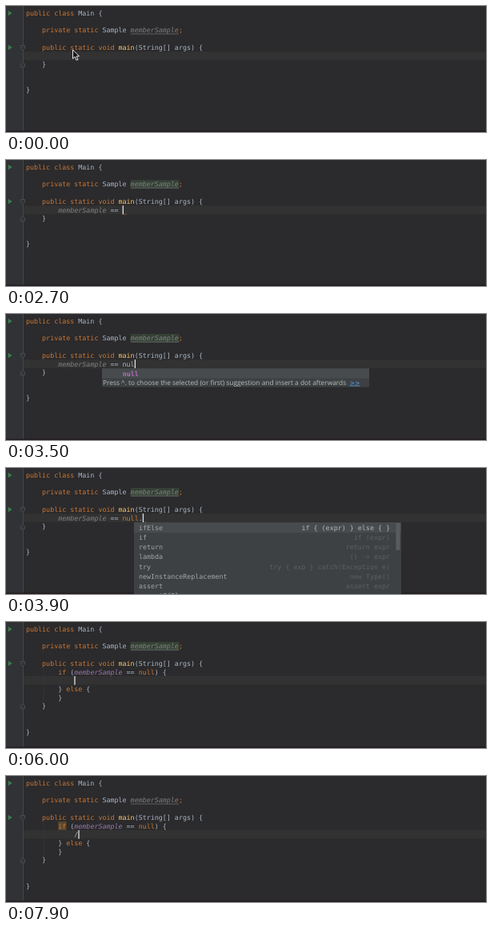
Recreate the animation shown at these times as an HTML page. Size 600 by 158 pixels, loop 8 s.

```html
<!DOCTYPE html>
<html lang="en">
<head>
<meta charset="utf-8">
<title>Postfix completion</title>
<style>
  html, body { margin: 0; width: 100%; height: 100%; overflow: hidden; background: #2b2a2c; }
  svg { display: block; width: 600px; height: 158px; }
  text { font: 8.35px "DejaVu Sans Mono", monospace; fill: #a9b7c6; white-space: pre; text-rendering: geometricPrecision; }
  .kw { fill: #cc7832; }
  .fn { fill: #ffc66d; }
  .unused { fill: #808084; font-style: italic; }
  .field { fill: #9876aa; font-style: italic; }
  .fold { fill: #2b2a2c; stroke: #595c5f; stroke-width: .7; }
  .run { fill: #3a7d4a; }
  .row { fill: #a2a6a8; }
  .dim { fill: #5c6062; }
  .lit { fill: #b4b8ba; }
  .end { text-anchor: end; }
  .word { fill: #b56cbc; font-weight: bold; }
  .hint { font: 8.36px "Open Sans", sans-serif; fill: #bbb; }
  .arrow { font: 6.2px "DejaVu Sans", sans-serif; }
  .link { font: 7.8px "DejaVu Sans", sans-serif; fill: #589df6; text-decoration: underline; }
</style>
</head>
<body>
<svg viewBox="0 0 600 158">
  <rect width="600" height="158" fill="#2b2a2c"/>
  <rect width="21" height="158" fill="#303235"/>
  <rect id="line" x="22" width="578" height="10.8" fill="#323232"/>
  <path d="M21.5 0V158" stroke="#454749"/>
  <rect y="156.5" width="600" height="1.5" fill="#231c23"/>
  <path class="run" d="M2.7 5.7L7.8 9L2.7 12.3zM2.7 48.7L7.8 52L2.7 55.3z"/>

  <rect data-t="1800-6500" x="155.7" y="25" width="61" height="10.8" fill="#344134"/>
  <path d="M155.7 35H216" stroke="#707073" stroke-width=".8"/>

  <g id="code"></g>
  <text id="typed" data-t="0-5600"><tspan></tspan><tspan></tspan><tspan></tspan><tspan></tspan><tspan></tspan></text>

  <g id="caret">
    <rect data-t="500-5300 5600-7500 7900-8000" width="1.3" height="11" fill="#e0e0e0"/>
    <path data-t="2700-2900 3800-4300 4900-5500" d="M.5 11.4l1.2-1 1.2 1 1.2-1 1 1" fill="none" stroke="#b0653a" stroke-width=".8"/>
  </g>
  <g id="popups"></g>
  <g data-t="5000-5500">
    <circle cx="487.4" cy="74.2" r="3.8" fill="#f0b650"/>
    <path d="M485.8 78.6h3M486.3 80h2" stroke="#a9a9a9" stroke-width=".9"/>
  </g>
  <path data-t="0-700" d="M83.5 55v11l2.6-2.4 2 4.4 1.9-.9-2-4.1h3.5z" fill="#111" stroke="#fff" stroke-width=".9"/>
</svg>
<script>
const LOOP = 8000, LEFT = 25, CHAR = 5.027, TOP = 3.55, PITCH = 10.72;
const $ = id => document.getElementById(id);
const colX = col => LEFT + col * CHAR;
const lineY = n => TOP + n * PITCH;
const span = (cls, s) => `<tspan class="${cls}">${s}</tspan>`;
const kw = s => span('kw', s);
const timed = (when, body) => `<g data-t="${when}">${body}</g>`;
const code = (n, col, body) => `<text x="${colX(col)}" y="${lineY(n) + 8.45}">${body}</text>`;
// Fold marker: a pentagon pointing down (dir 1) or up (dir -1)
const fold = (n, dir) =>
  `<path class="fold" transform="translate(21 ${lineY(n) + 5.8}) scale(1 ${dir})" d="M-2.5-2.7h5v3.6l-2.5 2-2.5-2zM-1.3-.4h2.6"/>`;

$('code').innerHTML =
  code(0, 0, kw('public class') + ' Main {') +
  code(2, 4, kw('private static') + ' Sample ' + span('unused', 'memberSample') + kw(';')) +
  code(4, 4, kw('public static void ') + span('fn', 'main') + '(String[] args) {') +
  fold(4, 1) +
  timed('0-5600', code(6, 4, '}') + code(9, 0, '}') + fold(6, -1)) +
  timed('5600-8000',
    '<path d="M47 57V100" stroke="#3b3b3b" stroke-dasharray="1 1"/>' +
    timed('6500-8000', `<rect x="${colX(8)}" y="${lineY(5)}" width="10.2" height="10.7" fill="#5a482c"/>`) +
    code(5, 8, kw('if') + ' (' + span('field', 'memberSample') + ' == ' + kw('null') + ') {') +
    code(7, 8, '} ' + kw('else') + ' {') + code(8, 8, '}') +
    code(9, 4, '}') + code(12, 0, '}') + fold(9, -1)) +
  timed('7900-8000', code(6, 12, '/'));

// Completion list: rows are [label, description]
function popup({ when, x, textX, rows, hint, step = 12.2, cls = 'row', mark = '' }) {
  const y = 68, w = 334, hintY = y + 1 + rows.length * step;
  const h = hint ? hintY - y + 10.9 : 100;
  let s = `<rect x="${x}" y="${y}" width="${w}" height="${h}" fill="#3d4143"/>` +
    `<rect x="${x}" y="${y + .5}" width="${w}" height="${step + .5}" fill="#474b4d"/>`;
  rows.forEach(([label, info = ''], i) => {
    const base = y + 9.7 + i * step;
    s += `<text class="${cls}" x="${textX}" y="${base}">${label}</text>` +
      `<text class="end ${i ? 'dim' : 'lit'}" x="480" y="${base}">${info}</text>`;
  });
  if (hint) s += `<text class="hint" x="${x + 1}" y="${hintY + 7.9}">${hint}  ${span('link', '&gt;&gt;')}</text>`;
  return timed(when, s + mark);
}

const dotHint = 'Press ^. to choose the selected (or first) suggestion and insert a dot afterwards';
const moveHint = `^${span('arrow', '↓')} and ^${span('arrow', '↑')} will move caret down and up in the editor`;
const ifRow = ['if', 'if (expr)'];
const ifElse = ['ifElse', 'if { (expr) } else { }'];

$('popups').innerHTML =
  popup({ when: '900-1500', x: 40, textX: colX(8), step: 11.7, hint: dotHint,
    rows: [[span('word', 'mem') + 'berSample']] }) +
  popup({ when: '3000-3300', x: 120, textX: colX(24), hint: dotHint,
    rows: [['null'], ['new'], ['notify']].map(([s]) => [span('word', s[0]) + s.slice(1)]) }) +
  popup({ when: '3300-3800', x: 120, textX: colX(24), step: 11.7, cls: 'word', hint: dotHint, rows: [['null']] }) +
  popup({ when: '3900-4500', x: 160, textX: 166,
    rows: [ifElse, ifRow, ['return', 'return expr'], ['lambda', '() -&gt; expr'],
      ['try', 'try { exp } catch(Exception e)'], ['newInstanceReplacement', 'new Type()'],
      ['assert', 'assert expr'], ['exceptIfElse']],
    mark: '<rect x="487.5" y="69" width="5" height="34" fill="#595c5e"/>' }) +
  popup({ when: '4500-5500', x: 160, textX: 166, hint: moveHint,
    rows: [ifRow, ifElse, ['ifElseIf', 'if { (expr) } elseif() { } else { }']],
    mark: '<text class="hint end" x="493.3" y="113.5" style="fill:#4f9be0">π</text>' });

// [time, characters typed]
const keys = [[0, 0], [700, 1], [800, 2], [900, 3], [1500, 12], [1800, 13], [2000, 14], [2300, 15],
  [2700, 16], [2900, 17], [3200, 18], [3500, 19], [3600, 20], [3800, 21], [4300, 22], [4900, 23], [5500, 20]];
// [text, class once complete]
const parts = [['memberSample', 'unused'], [' == ', ''], ['null', 'kw'], ['.', ''], ['if', 'kw']];
const typed = $('typed'), spans = [...typed.children];
typed.setAttribute('x', colX(8));
typed.setAttribute('y', lineY(5) + 8.45);

const windows = [...document.querySelectorAll('[data-t]')].map(el =>
  [el, el.dataset.t.split(' ').map(w => w.split('-').map(Number))]);

function draw(t) {
  for (const [el, list] of windows)
    el.style.display = list.some(([a, b]) => t >= a && t < b) ? '' : 'none';

  const count = keys.filter(k => k[0] <= t).pop()[1];
  let left = count;
  parts.forEach(([s, cls], i) => {
    const n = Math.max(0, Math.min(left, s.length));
    spans[i].textContent = s.slice(0, n);
    spans[i].setAttribute('class', n === s.length ? cls : '');
    left -= n;
  });

  const row = t < 5600 ? 5 : 6;
  const col = t < 5600 ? 8 + count : t < 7900 ? 12 : 13;
  $('line').setAttribute('y', lineY(row));
  $('caret').setAttribute('transform', `translate(${colX(col)} ${lineY(row)})`);
}

const start = performance.now();
function tick() {
  draw((performance.now() - start) % LOOP);
  requestAnimationFrame(tick);
}
tick();
</script>
</body>
</html>
```
